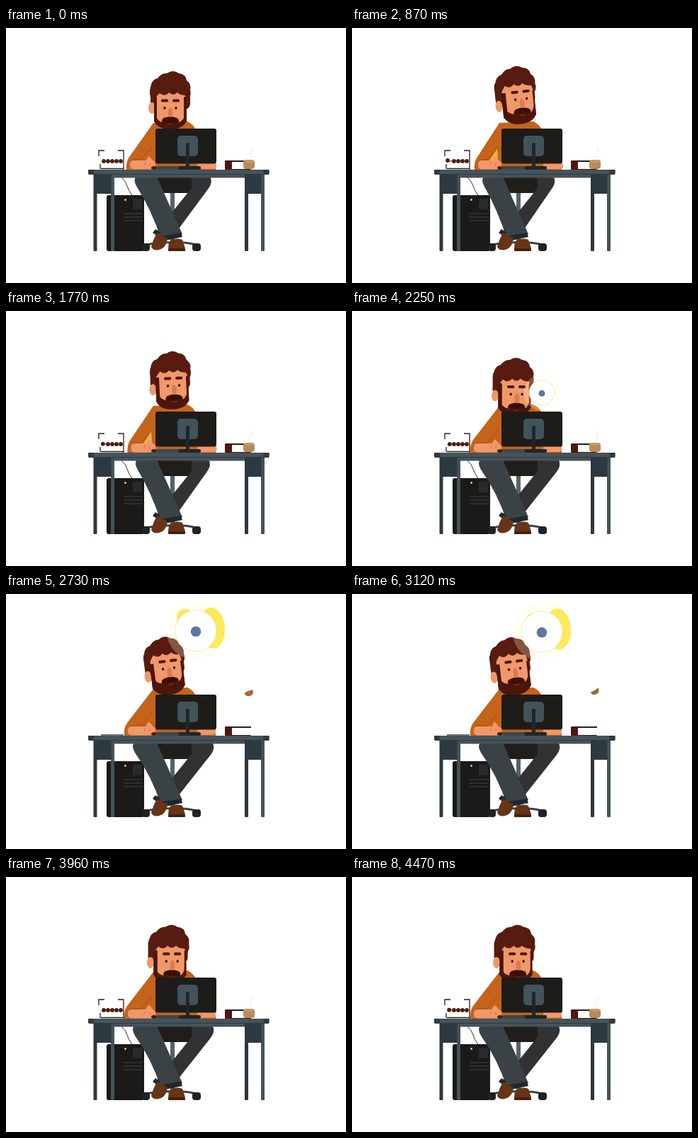
Animation of 480x360 px, one loop 4.5 s. Source, as an HTML page with a canvas:

```html
<!DOCTYPE html>
<html lang="en">
<head>
<meta charset="utf-8">
<title>Desk idea</title>
<style>
html, body { margin: 0; width: 100%; height: 100%; overflow: hidden; background: #fff; }
canvas { display: block; width: 480px; height: 360px; }
</style>
</head>
<body>
<canvas id="stage" width="480" height="360"></canvas>
<script>
const ctx = document.getElementById('stage').getContext('2d');
const LOOP = 4500, STEP = 30;
const HAIR = '#571c0f', BEARD = '#4b170b', SKIN = '#f0986a', SHIRT = '#c5631a';
const SLATE = '#435259', DARK = '#2d383e', YELLOW = '#fde95a';

// Smooth 0 to 1 between two times.
function ramp(t, from, to) {
  const p = Math.max(0, Math.min(1, (t - from) / (to - from)));
  return p * p * (3 - 2 * p);
}

// Rises between a and b, falls between c and d.
const pulse = (t, a, b, c, d) => ramp(t, a, b) - ramp(t, c, d);

function rect(c, x, y, w, h, r = 0) {
  ctx.fillStyle = c;
  ctx.beginPath();
  ctx.roundRect(x, y, w, h, r);
  ctx.fill();
}

function oval(c, x, y, rx, ry = rx, a = 0) {
  ctx.fillStyle = c;
  ctx.beginPath();
  ctx.ellipse(x, y, rx, ry, a, 0, Math.PI * 2);
  ctx.fill();
}

function shape(c, d) {
  ctx.fillStyle = c;
  ctx.fill(new Path2D(d));
}

function line(c, w, d) {
  ctx.strokeStyle = c;
  ctx.lineWidth = w;
  ctx.stroke(new Path2D(d));
}

function poseAt(t) {
  const up = pulse(t, 450, 780, 1600, 2100);
  const glance = pulse(t, 1080, 1260, 1590, 1830);
  const lean = ramp(t, 1600, 2190);
  const idea = pulse(t, 2400, 2640, 3660, 3840);
  const drift = ramp(t, 2730, 3570);
  return {
    x: 232 - 4 * lean + up + 9 * glance - 2 * idea + 2 * ramp(t, 3660, 3840),
    top: 61 + 5 * lean - 7 * up - 5.5 * idea + 1.5 * drift,
    tilt: 11 * glance - 6 * up - 7 * idea,
    turn: up - 2 * glance + .7 * lean,
    eye: 52 - 5 * up + 3 * glance - 6.5 * idea - .5 * lean,
    spread: .5 - .5 * up + .5 * lean,
    drift
  };
}

function lowerBody(s) {
  const l = 184 - 5 * s, r = 288 + 7 * s;
  rect('#566268', 232, 230, 6, 74);
  line('#3a4448', 3, 'M198 306 Q216 302 235 303 Q254 302 268 306');
  rect('#1d2225', 192, 304, 11, 11, 4);
  rect('#1d2225', 263, 304, 12, 11, 4);
  rect('#201e1b', 204, 208, 66, 25, 7);
  shape('#313233', `M262 208 H${r - 5} Q${r + 2} 216 ${r - 6} 227 L236 294 L212 288 L262 226 Z`);
  shape('#3a4246', `M${l + 3} 208 H212 L249 291 L219 298 Q205 256 ${l + 3} 224 Q${l - 3} 214 ${l + 3} 208 Z`);
  shape('#20282c', 'M217 294 L247 289 L249 295 L220 301 Z');
  shape('#20282c', 'M211 284 L218 289 L214 294 L207 289 Z');
  shape('#663416', 'M213 289 L228 297 Q226 311 216 313 Q208 315 205 309 Q208 298 213 289 Z');
  shape('#663416', 'M230 302 Q239 295 249 299 L253 311 H229 Z');
  rect('#422010', 229, 311, 24, 4, 1);
}

function tower() {
  rect('#1b1a18', 142, 236, 53, 79, 3);
  rect('#282a2b', 179, 241, 13, 15);
  for (let y = 261; y < 272; y += 5) rect('#2c2e2f', 166, y, 27, 2);
  oval('#d7cc9c', 168.5, 242.5, 1.5);
}

function torso(t, s) {
  const e = 173 - 6 * s;
  const tap = Math.sin(t / 65) * .8;
  shape(SHIRT, `M208 134 L${e + 4} 182 Q${e - 1} 189 ${e} 200 H296 V191 H268 V144 Q265 136 256 132 Z`);
  if (s < .3) shape('#e5b64d', 'M205 170 L194 187 H206 Z');
  line('#a64e15', 1, `M206 168 L191 186 H${e + 8}`);
  rect(SKIN, e + 5, 187, 206 - e, 12.5, 5);
  shape(SKIN, `M196 190 L201 ${181 + tap} Q207 184 209 192 Z`);
  line('#c9744a', 1, `M196 189 V194 M203 190 V${195 + tap}`);
  oval('#3a241c', 209, 197.5, 4, 2.5);
  rect(SHIRT, 212, 190, 60, 6);
  rect(SKIN, 270, 190, 28 - s * 2, 9 + tap / 2, 4);
}

function head({ x, top, tilt, turn, eye }) {
  const side = turn < 0 ? -1 : 1;
  const fx = turn * 6, cx = turn * 2;
  ctx.save();
  ctx.translate(x, top + 50);
  ctx.rotate(tilt * Math.PI / 180);
  ctx.translate(0, -50);

  rect(HAIR, -28 - cx, 18, 56, 36, 8);
  oval(SKIN, -26 * side, 52 + Math.abs(turn) * 2, 5, 8);
  rect(SKIN, cx - 22, 20, 44, 54, 9);
  rect(BEARD, cx - 23, 36, 4 + cx, 36, 1);
  rect(BEARD, cx + 19 + cx, 36, 4 - cx, 36, 1);

  // beard with skin dipping beside the moustache
  const dip = eye + 20;
  shape(BEARD, `M${cx - 23} ${eye + 2} Q${cx - 20} ${dip - 2} ${fx - 12} ${dip}
    Q${fx - 13} ${eye + 14} ${fx - 6} ${eye + 13} Q${fx} ${eye + 11} ${fx + 6} ${eye + 13}
    Q${fx + 13} ${eye + 14} ${fx + 12} ${dip} Q${cx + 20} ${dip - 2} ${cx + 23} ${eye + 2}
    V70 Q${cx + 18} 82 ${cx} 82 Q${cx - 18} 82 ${cx - 23} 70 Z`);
  oval('#dc7a50', fx + turn, eye + 6, 3.5, 7);
  shape('#3a1008', `M${fx - 12} ${eye + 19} Q${fx - 9} ${eye + 12} ${fx} ${eye + 13}
    Q${fx + 9} ${eye + 12} ${fx + 12} ${eye + 19} Q${fx} ${eye + 22} ${fx - 12} ${eye + 19} Z`);
  line('#7d2b1c', 1.3, `M${fx - 4} ${eye + 22} Q${fx} ${eye + 24} ${fx + 4} ${eye + 22}`);

  for (const d of [-8, 8]) {
    oval('#351c16', fx + d, eye, 1.7, 2);
    rect('#4b1a0e', fx + d - 5, eye - 12.5, 10, 4, 1.5);
  }

  const f = eye - 18;
  shape(HAIR, `M-26 42 Q-31 31 -28 23 Q-27 12 -18 10 Q-12 2 -5 3 Q4 -3 12 3
    Q22 4 23 13 Q30 18 28 27 Q30 33 26 39 L${cx + 20} ${f}
    Q14 ${f} 10 ${f - 4} Q4 ${f + 2} -2 ${f - 4} Q-8 ${f + 3} -15 ${f - 3} L${cx - 20} ${f + 2} Z`);
  ctx.restore();
}

function bubble(t, drift) {
  if (t < 2130 || t >= 3810) return;
  const x = 268;
  const y = 146 - 100 * ramp(t, 2110, 2490) + 6 * ramp(t, 2640, 2730) + 3 * drift;
  const r = 29 * pulse(t, 2100, 2360, 3660, 3810);
  const k = r / 29, glow = ramp(t, 2550, 2730) * k;
  oval('rgba(255,250,215,.26)', x, y, r * 1.43);
  oval(YELLOW, x + 23 * glow, y - 4 * glow, 18 * k, 29 * k, -.08);
  oval(YELLOW, x - 15 * glow, y - 19 * glow, 12 * glow * (1 - drift));
  oval('#fff', x, y, r);
  ctx.strokeStyle = '#f5e3a8';
  ctx.lineWidth = .8;
  ctx.stroke();
  oval('#5f779f', x, y + 1, r * .25);
}

function monitor() {
  rect('#1e1c19', 211, 142, 86, 49.5, 3);
  rect('#43535a', 242, 152, 29, 29, 5);
  rect('#1e272b', 254, 162, 5, 35, 2);
  rect('#1e272b', 240, 195, 35, 5, 2);
  rect('#3a484f', 213, 195, 31, 5, 1);
}

function cradle(t) {
  const sway = Math.sin(t / 180);
  line('#281d18', 1.3, 'M131 181 V173 H139 M158 173 H166 V200 M131 173 V178 M134 198.5 H166 M133 192 V199');
  for (let i = 0; i < 5; i++) {
    const edge = i === 0 ? Math.min(0, sway) : i === 4 ? Math.max(0, sway) : 0;
    oval('#511d13', 138 + i * 6 + edge * 3, 188 - Math.abs(edge), 2.9);
  }
  line('#511d13', 1, 'M136 188 H165');
}

function cup(t) {
  rect('#b88b5c', 335, 186, 16, 13, 4);
  oval('#c79a70', 343, 188, 7, 2);
  const w = Math.sin(t / 150) * 2;
  line('rgba(200,185,150,.3)', 1, `M346 184 Q${344 + w} 179 346 175 Q${348 - w} 172 346 169`);
}

function splash(t, drift) {
  ctx.save();
  ctx.translate(343, 186 - 46 * ramp(t, 2580, 2730) - 5 * drift);
  ctx.rotate(-.1 - .45 * drift);
  shape('#ae6437', `M-6 -1 Q-2 ${-4 + 7 * drift} 6 -4 Q7 3 1 4 Q-6 5 -6 -1 Z`);
  ctx.restore();
}

function books() {
  rect('#4f1711', 309, 187, 37, 13, 1);
  rect('#fff', 319, 189, 27, 10);
  rect('#271b18', 311, 187, 35, 1.5);
}

function desk() {
  for (const x of [123.5, 337]) rect(DARK, x, 206, 5, 109, 1);
  for (const x of [148, 360]) rect(SLATE, x, 206, 5, 109, 1);
  for (const x of [125, 337]) rect('#2d3940', x, 206, 23.5, 28);
  rect('#465259', 153, 206, 184, 5.5);
  rect('#465359', 116, 200, 255.5, 6.5, 1);
  line('#303b40', 1, 'M117 206.5 H371');
  for (const x of [116, 363.5]) rect('#303a40', x, 200, 8, 6, 1);
}

function draw(t) {
  const pose = poseAt(t);
  const away = t >= 2580 && t < 3810;
  ctx.fillStyle = '#fff';
  ctx.fillRect(0, 0, 480, 360);
  tower();
  if (!away) line('#332e2b', 1, 'M163 211 Q169 216 171 223 Q173 230 178 236');
  lowerBody(pose.spread);
  torso(t, pose.spread);
  head(pose);
  bubble(t, pose.drift);
  monitor();
  books();
  if (away) {
    splash(t, pose.drift);
    line('#252a2b', 1.3, 'M134 199 H166');
  } else {
    cup(t);
    cradle(t);
  }
  desk();
}

const start = performance.now();
function tick() {
  const t = (performance.now() - start) % LOOP;
  draw(Math.floor(t / STEP) * STEP);
  requestAnimationFrame(tick);
}
tick();
</script>
</body>
</html>
```
